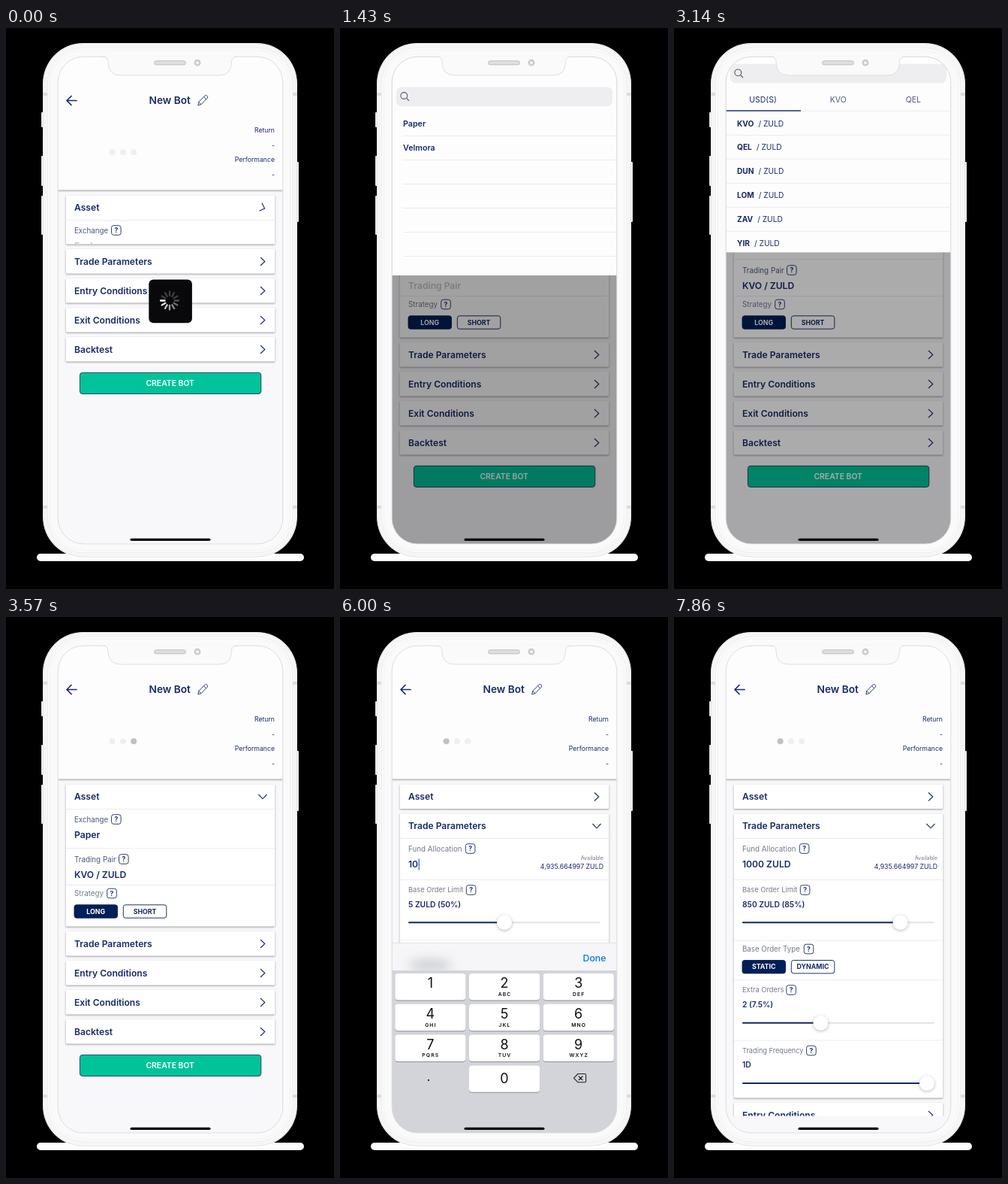
An HTML page for the animation above (8 s loop, 437 px wide and 746 px high).

```html
<!DOCTYPE html>
<html lang="en">
<head>
<meta charset="utf-8">
<title>New Bot</title>
<style>
html, body { margin: 0; width: 100%; height: 100%; overflow: hidden; background: #000; }
svg { display: block; }
text { font-family: Inter, "Open Sans", sans-serif; white-space: pre; }
.card { filter: drop-shadow(0 1px 1.3px rgba(0,0,0,.38)); }
.knob { filter: drop-shadow(0 1px 2px rgba(0,0,0,.28)); }
</style>
</head>
<body>
<svg id="stage" width="437" height="746" viewBox="0 0 437 746"></svg>
<script>
const NAVY = '#172a66', DEEP = '#001f57', GREY = '#737a8d', SLATE = '#4c567c', FAINT = '#c3c4cb';
const LOOP = 8000;
const COIN = 'ZULD';
const PAIRS = ['KVO', 'QEL', 'DUN', 'LOM', 'ZAV', 'YIR'];

// ---- drawing helpers ----
// y is the middle of the capitals
const txt = (x, y, s, size, o = {}) =>
  `<text x="${x}" y="${(y + size * .364).toFixed(2)}" font-size="${size}" font-weight="${o.w || 400}" ` +
  `fill="${o.c || NAVY}" text-anchor="${o.a || 'start'}" ${o.x || ''}>${s}</text>`;
const rect = (x, y, w, h, fill, r = 0, more = '') =>
  `<rect x="${x}" y="${y}" width="${w}" height="${h}" rx="${r}" fill="${fill}" ${more}/>`;
const path = (d, stroke, w = 1, more = '') =>
  `<path d="${d}" fill="none" stroke="${stroke}" stroke-width="${w}" ${more}/>`;
const range = (n, f) => Array.from({ length: n }, (_, i) => f(i)).join('');
const rule = y => rect(80, y, 278, .8, '#e9e9ee');

const help = (x, y) =>
  rect(x, y - 6.3, 12.6, 12.6, '#fff', 3, `stroke="${NAVY}" stroke-width=".9"`) +
  txt(x + 6.3, y, '?', 8.5, { w: 700, a: 'middle' });
const label = (y, s, size, hx, c = GREY) => txt(91, y, s, size, { c }) + help(hx, y);
const pill = (x, y, s, on) =>
  rect(x, y - 8.7, 57.5, 17.4, on ? DEEP : '#fff', 3, `stroke="${DEEP}" stroke-width=".9"`) +
  txt(x + 28.75, y, s, 8.8, { w: 700, a: 'middle', c: on ? '#fff' : NAVY });
const knobX = v => 101 + 236 * v;
const slider = (y, v, id) =>
  rect(91, y - 1, 256, 2, '#e2e2e7', 1) +
  rect(91, y - 1, knobX(v) - 91, 2, NAVY, 1, `id="${id}Fill"`) +
  `<circle id="${id}Knob" class="knob" cx="${knobX(v)}" cy="${y}" r="10" fill="#fff"/>`;

// ---- cards ----
const assetBody =
  rule(32.5) + label(46.5, 'Exchange', 9.75, 140.5, SLATE) +
  txt(91, 67.5, 'Exchange', 12.2, { w: 600, x: 'id="exchange"' }) +
  rule(84.5) + label(99.5, 'Trading Pair', 9.8, 150.5, SLATE) +
  txt(91, 120.5, 'Trading Pair', 12.1, { w: 600, x: 'id="pair"' }) +
  rule(133.5) + label(145, 'Strategy', 9.8, 134.7) +
  pill(91, 169, 'LONG', true) + pill(156.3, 169, 'SHORT', false);

const tradeBody =
  rule(32.5) + label(46.5, 'Fund Allocation', 9.8, 167.3) +
  txt(91, 67.5, '', 12.1, { w: 600, x: 'id="fund"' }) +
  rect(0, 60, 1.2, 15, '#2d5bd0', 0, 'id="caret"') +
  txt(351, 59, 'Available', 7.2, { a: 'end', c: GREY }) +
  txt(351, 70, '4,935.664997 ' + COIN, 8.8, { a: 'end' }) +
  rule(87.5) + label(101.5, 'Base Order Limit', 9.35, 168.3) +
  txt(91, 120.3, '', 10.3, { w: 600, x: 'id="limit"' }) + slider(144.7, .5, 'limit') +
  rule(168) + label(180, 'Base Order Type', 9.7, 173.2) +
  pill(91, 203.7, 'STATIC', true) + pill(156.3, 203.7, 'DYNAMIC', false) +
  rule(221) + label(234.5, 'Extra Orders', 9.35, 149.8) +
  txt(91, 253.5, '', 10.3, { w: 600, x: 'id="extra"' }) + slider(278.2, .4, 'extra') +
  rule(301) + label(315, 'Trading Frequency', 9.2, 176.6) +
  txt(91, 333.7, '1D', 10.3, { w: 600 }) + slider(358.6, 1, 'freq');

const card = (i, title, body = '') =>
  `<g id="card${i}"><rect id="back${i}" class="card" x="79.7" y="0" width="278.6" height="32.5" rx="1" fill="#fff"/>` +
  `<svg id="clip${i}" width="437" height="32.5">${body}` +
  txt(91, 16.5, title, 12.1, { w: 600 }) +
  path('M-3 -5.5 L2.8 0 L-3 5.5', NAVY, 1.1, `id="chev${i}"`) + '</svg></g>';

const header =
  rect(69, 38, 300, 177.5, '#fefdfe', 0, 'style="filter:drop-shadow(0 1px 1px rgba(0,0,0,.4))"') +
  path('M94 96.5 H81.5 M87 90.5 L81 96.5 L87 102.5', NAVY, 1.7, 'stroke-linecap="round" stroke-linejoin="round"') +
  txt(190.5, 96.5, 'New Bot', 13.7, { w: 600 }) +
  path('M255.8 102.8 L256.8 98.4 L265.2 90 Q266.5 89 267.8 90.2 Q269.4 91.7 268.2 93.2 L260 101.6 Z M263.6 91.6 L266.8 94.9 M256.8 98.4 L260 101.6',
    NAVY, .9, 'stroke-linejoin="round"') +
  range(3, i => `<circle id="dot${i}" cx="${141.6 + 14.3 * i}" cy="165.3" r="4"/>`) +
  txt(358, 135.5, 'Return', 8.7, { a: 'end' }) + txt(358, 155.5, '-', 8.7, { a: 'end' }) +
  txt(358, 175.2, 'Performance', 8.7, { a: 'end' }) + txt(358, 195.2, '-', 8.7, { a: 'end' });

const spinner = `<g id="spinner">` + rect(190.3, 334.6, 57.6, 57.6, '#09090b', 6) +
  range(12, i => `<path id="spoke${i}" d="M0 -6.5 V-12" stroke="#fff" stroke-width="2.3" stroke-linecap="round" ` +
    `transform="translate(218 362.5) rotate(${i * 30})"/>`) + '</g>';

// ---- drop-down panels ----
const panel = (id, rows) => `<g id="${id}">` + rect(69, -280, 300, 609, '#fefdfe') +
  rect(75, 78.5, 288, 25.5, '#eeedf0', 7) +
  '<circle cx="85.3" cy="90" r="4.4" fill="none" stroke="#5b5b63" stroke-width="1.1"/>' +
  path('M88.5 93.2 L92 96.8', '#5b5b63', 1.2) + rows + '</g>';

const exchanges = txt(84, 127.3, 'Paper', 10.7, { w: 600 }) + txt(84, 159.3, 'Velmora', 10.7, { w: 600 }) +
  range(6, i => rect(84, 143 + 32 * i, 285, .8, '#e6e6eb'));
const pairs = ['USD(S)', PAIRS[0], PAIRS[1]]
  .map((s, i) => txt(118.5 + 100.2 * i, 125.8, s, 10.5, { a: 'middle', c: i ? SLATE : NAVY })).join('') +
  range(6, i => rect(69, 140.5 + 32 * i, 300, .8, '#e6e6eb') +
    `<text x="84" y="${161.2 + 31.9 * i}" font-size="10.2" fill="${NAVY}"><tspan font-weight="700">${PAIRS[i]}</tspan><tspan dx="6">/ ${COIN}</tspan></text>`) +
  rect(69, 140, 100, 1.4, NAVY);

// ---- keyboard ----
const letters = ['', '', 'ABC', 'DEF', 'GHI', 'JKL', 'MNO', 'PQRS', 'TUV', 'WXYZ'];
const key = n => {
  const col = n ? (n - 1) % 3 : 1, row = n ? Math.floor((n - 1) / 3) : 3;
  const x = 73.3 + 98.7 * col, y = 474 + 40.8 * row;
  return rect(x, y + 1, 94.2, 35.4, '#8d8f95', 4) + rect(x, y, 94.2, 35.4, '#fff', 4, `id="key${n}"`) +
    txt(x + 47, y + (n ? 12.7 : 17.3), n, 18, { a: 'middle', c: '#111' }) +
    txt(x + 47.5, y + 27.3, letters[n], 6.8, { a: 'middle', w: 600, c: '#111', x: 'letter-spacing="1.1"' });
};
const keyboard = '<g id="keyboard">' + rect(69, 433, 300, 38, '#f6f6f8') +
  '<ellipse cx="120" cy="463" rx="29" ry="8" fill="#cfd0d4" style="filter:blur(7px)"/>' +
  rect(69, 433, 300, .8, '#dcdce0') + rect(69, 470, 300, 220, '#d2d4da') +
  txt(354.5, 454, 'Done', 12.3, { a: 'end', w: 500, c: '#0a78e8' }) +
  range(10, key) + txt(118, 611, '.', 17, { a: 'middle', c: '#111' }) +
  path('M317 607.5 H326 Q327.6 607.5 327.6 609 V617.3 Q327.6 618.8 326 618.8 H317 L311.5 613.2 Z M317.8 610.5 L323.4 616 M323.4 610.5 L317.8 616', '#222', 1.1, 'stroke-linejoin="round"') +
  '</g>';

// ---- phone ----
const rim = (d, c, w = 1) => rect(49.5 + d, 20.5 + d, 338 - 2 * d, 683 - 2 * d, 'none', 54 - d, `stroke="${c}" stroke-width="${w}"`);
const phone =
  rect(41, 699, 356, 10, '#fdfdfd', 5) +
  [[47, 112, 20], [47, 170, 40], [47, 223, 52], [387, 178, 80]].map(b => rect(b[0], b[1], 3, b[2], '#eaeaea', 1)).join('') +
  rect(49, 20, 339, 684, '#fafafa', 54) + rim(.3, '#e3e3e3') + rim(3, '#f0f0f0') + rim(5.5, '#e6e6e6', .8) + rim(9, '#f1f1f1', .8) +
  [[49, 86], [382, 86], [49, 635], [382, 635]].map(b => rect(b[0], b[1], 6, 4, '#dcdcdc')).join('');
const notch =
  rect(69.2, 38.2, 299.6, 647.8, 'none', 34, 'stroke="#dadada" stroke-width=".9"') +
  '<path d="M128 37.2 Q136 37.5 136 45 Q136 63 153 63 H284 Q300.5 63 300.5 45 Q300.5 37.5 308 37.2 Z" fill="#fafafa"/>' +
  path('M128 38.2 Q136 38.2 136 45 Q136 63 153 63 H284 Q300.5 63 300.5 45 Q300.5 38.2 308 38.2', '#dcdcdc', .9) +
  rect(197.5, 43.7, 42, 5.2, '#dedede', 2.6, 'stroke="#bdbdbd" stroke-width=".9"') +
  '<circle cx="255" cy="46.2" r="4.4" fill="#c9c9c9"/><circle cx="255" cy="46.2" r="2.2" fill="#efefef"/>';

document.getElementById('stage').innerHTML =
  '<clipPath id="screen">' + rect(69.2, 38.2, 299.6, 647.8, '#000', 34) + '</clipPath>' + phone +
  '<g clip-path="url(#screen)">' + rect(69, 38, 300, 649, '#f8f7fa') +
  '<svg width="437" height="663.5">' +
  card(0, 'Asset', assetBody) + card(1, 'Trade Parameters', tradeBody) +
  card(2, 'Entry Conditions') + card(3, 'Exit Conditions') + card(4, 'Backtest') +
  '<g id="create">' + rect(98.4, 0, 241.4, 28.2, '#00c39a', 3.5, 'stroke="#17395a" stroke-width=".9"') +
  txt(218.7, 14.2, 'CREATE BOT', 10.4, { w: 600, a: 'middle', c: '#fff' }) + '</g></svg>' +
  header + spinner + rect(69, 38, 300, 649, '#000', 0, 'id="dim"') +
  panel('panelA', exchanges) + panel('panelB', pairs) + keyboard +
  rect(165.5, 678.7, 107, 3.3, '#050505', 1.65) + '</g>' + notch;

// ---- motion ----
const el = {};
document.querySelectorAll('[id]').forEach(e => el[e.id] = e);
const set = (id, k, v) => el[id].setAttribute(k, v);
const show = (id, on) => set(id, 'visibility', on ? 'visible' : 'hidden');
const say = (id, s) => { if (el[id].textContent !== s) el[id].textContent = s; };

const prog = (t, start, len) => Math.min(1, Math.max(0, (t - start) / len));
const smooth = p => p * p * (3 - 2 * p);
const outCubic = p => 1 - (1 - p) ** 3;
const drop = (t, open, close) => outCubic(prog(t, open, 340)) - prog(t, close, 510) ** 1.75;

const PRESSES = [[5500, 1], [5790, 0], [6080, 0], [6380, 0]];
const FOCUS = 4840, DONE = 6800;

function layout(t) {
  const swap = smooth(prog(t, 3900, 340));
  const open = [smooth(prog(t, -87, 300)) * (1 - swap), swap, 0, 0, 0];
  const grow = [156.5, 345.5, 0, 0, 0];
  let y = 222.5;
  open.forEach((o, i) => {
    const h = 32.5 + grow[i] * o;
    set('card' + i, 'transform', `translate(0 ${y})`);
    set('back' + i, 'height', h);
    set('clip' + i, 'height', h);
    set('chev' + i, 'transform', `translate(342 16.5) rotate(${90 * o})`);
    y += h + 6.5;
  });
  set('create', 'transform', `translate(0 ${y + 8.3})`);
}

function form(t) {
  const typed = PRESSES.filter(p => t >= p[0] + 40).map(p => p[1]).join('');
  const editing = t >= FOCUS && t < DONE;
  const ready = t >= DONE;
  say('fund', typed && !ready ? typed : '1000 ' + COIN);
  set('fund', 'fill', typed ? NAVY : FAINT);
  show('caret', editing && (t - FOCUS) % 1060 < 530);
  set('caret', 'x', typed ? 91.5 + el.fund.getComputedTextLength() : 91);

  const pct = Math.round(50 + 35 * smooth(prog(t, 7180, 640)));
  const total = typed ? +typed : 1000;
  say('limit', `${+(total * pct / 100).toFixed(2)} ${COIN} (${pct}%)`);
  say('extra', `2 (${(100 - pct) / 2}%)`);
  set('limitKnob', 'cx', knobX(pct / 100));
  set('limitFill', 'width', knobX(pct / 100) - 91);

  say('exchange', t < 1430 ? 'Exchange' : 'Paper');
  set('exchange', 'fill', t < 1430 ? FAINT : NAVY);
  say('pair', t < 3000 ? 'Trading Pair' : `${PAIRS[0]} / ${COIN}`);
  set('pair', 'fill', t < 3000 ? FAINT : NAVY);
}

function draw(t) {
  layout(t);
  form(t);

  const lit = t < 130 ? -1 : Math.floor((t + 1890) / 320) % 3;
  for (let i = 0; i < 3; i++) set('dot' + i, 'fill', i === lit ? '#c2c1c5' : '#efeef1');

  show('spinner', t < 640);
  const head = 9 + Math.floor(t / 83);
  for (let i = 0; i < 12; i++) {
    const age = ((head - i) % 12 + 12) % 12;
    set('spoke' + i, 'opacity', Math.max(.22, 1 - age * .12));
  }

  const a = drop(t, 780, 1430), b = drop(t, 2390, 3000);
  [['panelA', a], ['panelB', b]].forEach(([id, p]) => {
    show(id, p > 0);
    set(id, 'transform', `translate(0 ${-291 * (1 - p)})`);
  });
  set('dim', 'opacity', .37 * Math.max(a, b));

  const up = outCubic(prog(t, FOCUS, 300)) - smooth(prog(t, DONE, 290));
  show('keyboard', up > 0);
  set('keyboard', 'transform', `translate(0 ${256 * (1 - up)})`);
  for (const n of [0, 1]) {
    const down = PRESSES.some(p => p[1] === n && t >= p[0] && t < p[0] + 120);
    set('key' + n, 'fill', down ? '#b4b8c1' : '#fff');
  }
}

const start = performance.now();
(function tick() {
  draw((performance.now() - start) % LOOP);
  requestAnimationFrame(tick);
})();
</script>
</body>
</html>
```
